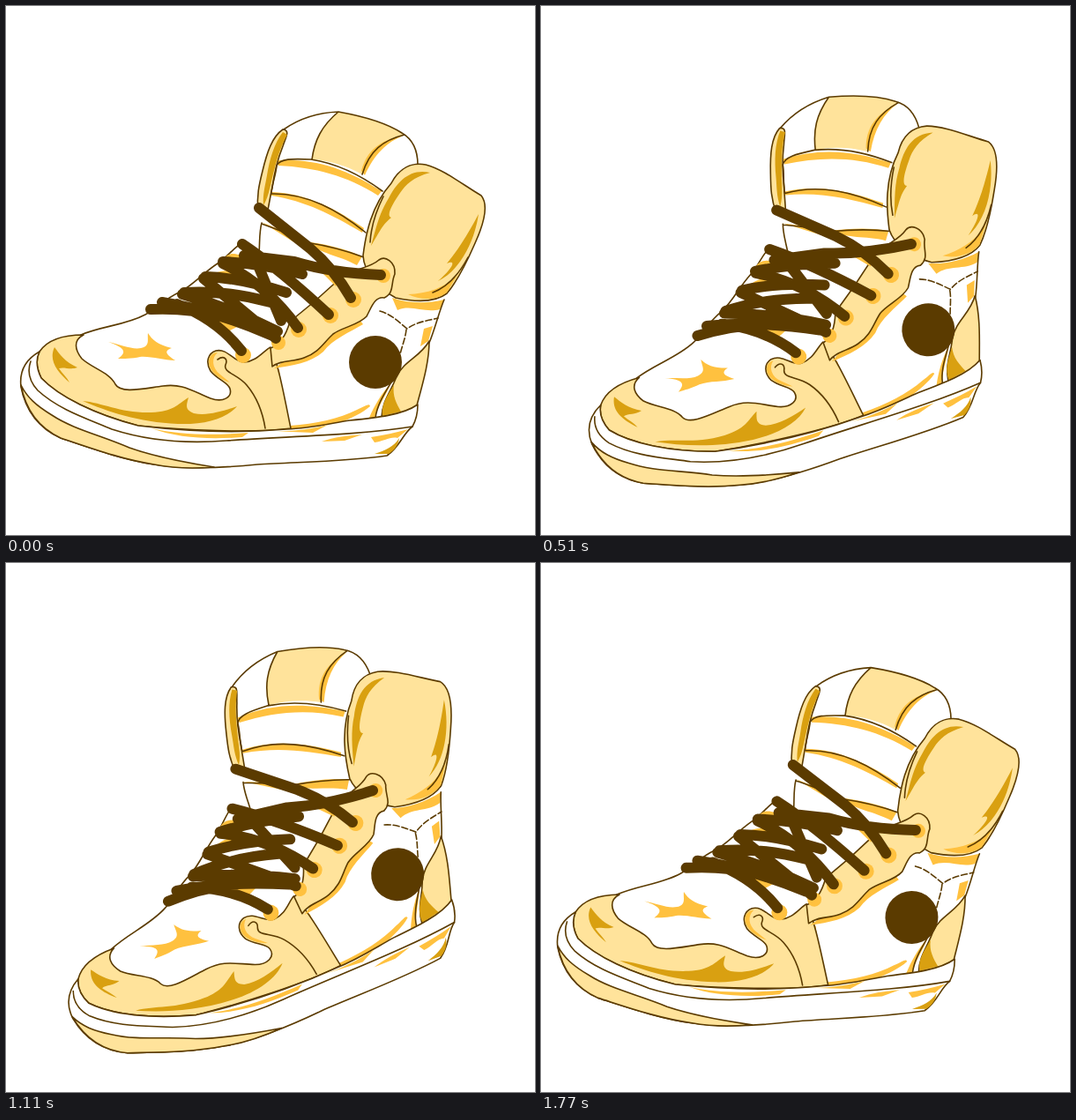
Write an HTML page that moves like this. It is 600 px wide and 600 px high and loops after 1800 ms.

```html
<!DOCTYPE html>
<html lang="en">
<head>
<meta charset="utf-8">
<title>Rocking sneaker</title>
<style>
  html, body { margin: 0; width: 100%; height: 100%; overflow: hidden; background: #fff; }
  svg { display: block; width: 100vw; height: 100vh; }
  path { fill: none; stroke-linejoin: round; stroke-linecap: round; }
  .ink { stroke: #5b3b00; stroke-width: 1.6; }
  .white { fill: #fff; }
  .pale { fill: #ffe39b; }
  .amber { fill: #ffc13f; }
  .gold { fill: #d9a011; }
  .dash { stroke-dasharray: 7 3; }
  .laces { stroke: #5b3b00; stroke-width: 12; }
  .mark { fill: #5b3b00; }
</style>
</head>
<body>
<svg viewBox="0 0 600 600">
<g id="shoe">
  <!-- vamp and quarter -->
  <path class="white" d="M85 373C110 364 140 360 160 348L215 314 245 285 285 250 440 325 497 335C490 350 487 366 481 382L467 452 318 480 150 470Z"/>
  <path class="ink" d="M85 373C108 363 136 362 158 350C170 344 178 333 198 324C214 315 222 304 240 292C252 284 258 274 270 267"/>
  <path class="amber" d="M222 315C232 304 240 298 262 301L298 316 286 320C268 306 240 306 222 315ZM246 287C254 278 262 280 276 288L268 292ZM196 330L212 324 222 332Z"/>
  <path class="amber" d="M116 381C130 384 143 390 153 388C164 386 160 378 161 371C166 379 172 384 188 388C179 391 181 395 192 402C178 402 165 397 152 398C143 400 133 400 127 400C137 393 136 388 116 381Z"/>

  <!-- tongue -->
  <path class="white" d="M315 140C332 128 352 121 377 120C405 125 432 133 449 144C461 151 467 162 467 182L405 290 287 278 286 222Z"/>
  <path class="pale ink" d="M314 140C302 148 296 166 291 187C287 203 284 216 286 232L296 236C299 222 300 214 302 206C304 191 308 174 314 159C317 149 323 141 314 140Z"/>
  <path class="gold" d="M314 143C304 156 299 174 296 192C294 204 291 213 292 226C299 215 300 200 305 183C309 168 313 157 319 146Z"/>
  <path class="pale" d="M377 120C405 125 430 132 452 146C428 152 412 164 404 191C386 181 366 175 347 174C350 152 358 138 377 120Z"/>
  <path class="amber" d="M451 147C432 154 418 168 407 192L403 187C409 164 424 152 451 147Z"/>
  <path class="amber" d="M309 175C350 173 385 184 426 210L422 215C386 192 350 183 309 181ZM301 211C342 212 377 232 406 252L404 257C372 238 340 221 301 215ZM290 245C305 252 320 256 335 264L330 270ZM340 267C360 270 382 274 404 284L398 294C376 282 358 282 340 267Z"/>
  <path class="ink" d="M315 140C332 128 352 121 377 120C405 125 432 133 449 144C461 151 467 162 467 180M377 120C358 136 350 152 347 174M452 146C428 152 412 164 404 191M307 181C311 173 324 173 346 174C378 179 404 193 427 210M307 181C306 193 301 203 301 213C342 212 377 232 408 257M290 246C287 257 288 268 287 280M290 247C304 252 316 256 330 264M340 268C365 272 385 277 406 285"/>

  <!-- ankle flap -->
  <path class="pale ink" d="M437 201C446 184 460 177 476 180C496 185 520 204 539 215C548 226 542 247 532 269C522 292 512 312 500 326C487 336 465 336 442 331C422 320 406 302 405 283C408 259 414 227 437 201Z"/>
  <path class="gold" d="M481 189C458 184 444 199 434 218C424 234 420 250 414 272C425 254 427 248 437 240C430 238 440 222 447 212C453 203 462 194 481 189ZM536 236C522 262 513 276 500 292C512 287 506 298 490 312C513 301 531 270 536 236Z"/>
  <path class="amber" d="M514 302C502 318 480 326 456 327C472 335 490 333 500 325Z"/>
  <path class="ink" d="M428 216C420 232 414 250 413 268M524 285C514 304 502 318 484 325"/>

  <!-- heel -->
  <path class="amber" d="M438 331C455 337 476 338 497 333L492 344C475 349 460 338 444 345Z"/>
  <path class="pale ink" d="M480 380C470 398 452 402 443 420C437 437 427 447 426 466L452 461 466 453C472 430 480 405 480 380Z"/>
  <path class="gold" d="M440 430C432 442 425 453 427 465L448 460C443 451 438 442 440 430Z"/>
  <path class="amber" d="M437 427C425 441 418 453 412 467L418 467C424 450 432 440 437 427ZM474 366L484 363 479 380 470 386Z"/>
  <path class="ink" d="M497 333C491 347 487 365 480 382M438 425C429 440 421 452 419 467"/>
  <path class="ink dash" d="M424 346C438 350 446 359 455 366C466 358 478 357 490 354M454 367C453 378 448 388 446 400"/>
  <circle class="mark" cx="419" cy="404" r="30"/>
  <path class="amber" d="M322 476C352 474 378 468 398 458C408 454 412 450 413 454C404 462 392 467 378 473L322 480ZM302 409C307 424 310 438 317 452C315 438 311 424 310 412Z"/>

  <!-- toe cap -->
  <path class="pale ink" d="M38 392C46 380 62 373 88 373C76 379 78 390 86 400C98 411 118 416 124 429C130 440 155 434 178 431C200 428 210 436 232 445C246 450 257 444 254 434C252 427 240 424 232 414C226 404 229 394 238 391C252 388 258 404 270 404C285 403 292 391 300 387C309 405 316 445 323 479C280 485 200 481 150 476C100 463 60 443 40 422C34 410 34 400 38 392Z"/>
  <path class="gold" d="M87 448C110 450 130 462 165 461C190 460 194 452 207 444C205 452 202 458 213 462C228 465 245 460 262 454C250 468 225 475 195 474C150 472 115 460 87 448ZM55 387C61 395 67 404 81 410C73 413 66 409 60 411C64 417 69 421 72 427C58 415 48 402 55 387Z"/>
  <path class="amber" d="M240 393C233 399 233 410 243 418L254 427C243 424 230 414 230 404C230 397 234 393 240 393Z"/>
  <path class="ink" d="M240 401C247 396 252 400 249 407C246 416 262 417 273 430C284 443 291 460 294 479"/>

  <!-- sole -->
  <path class="white ink" d="M38 392C22 401 15 415 17 432C22 458 36 478 62 490C95 501 130 514 168 520C205 526 245 524 285 520C330 517 385 517 432 510C447 500 450 485 461 477C466 468 467 460 467 452C450 464 420 467 390 470C365 474 345 479 318 480C260 485 200 482 150 476C100 463 60 443 40 422C34 410 34 400 38 392Z"/>
  <path class="pale ink" d="M17 430C22 457 36 478 62 490C95 501 130 514 168 520C188 524 210 525 236 523C198 517 168 511 140 501C108 487 76 480 52 464C34 453 24 444 17 430Z"/>
  <path class="amber" d="M165 479C200 487 235 487 275 484L268 489C230 492 195 490 165 479ZM300 482C325 483 345 480 365 475L348 484ZM358 494C372 489 388 487 404 486L384 493ZM414 489C428 487 442 484 456 480L444 490C436 488 428 494 418 495Z"/>
  <path class="gold" d="M446 490C440 500 430 504 418 508L434 508C442 503 445 497 446 490Z"/>
  <path class="ink" d="M28 403C24 414 26 425 36 436C60 458 92 468 120 480C160 493 200 497 250 493C320 488 400 487 461 477"/>

  <!-- eyestay -->
  <path class="amber" d="M304 411C325 408 345 405 360 392C370 378 390 370 405 361L398 352 330 392Z"/>
  <path class="pale ink" d="M300 388C312 384 318 372 322 358L350 335 380 308C395 297 412 298 423 288C430 283 442 290 441 304C436 315 441 325 429 331C418 329 414 343 409 352C400 362 382 364 371 372C360 382 355 393 338 399C325 404 312 401 302 409Z"/>
  <g class="amber">
    <circle cx="428" cy="306" r="8"/><circle cx="394" cy="333" r="9"/><circle cx="368" cy="351" r="9"/>
    <circle cx="332" cy="367" r="9"/><circle cx="309" cy="382" r="8"/><circle cx="269" cy="396" r="9"/>
  </g>
  <path class="amber" d="M250 340C268 342 282 350 296 360L280 364ZM226 350C240 350 250 358 262 364L250 370ZM352 296L380 306 374 318Z"/>

  <!-- laces -->
  <path class="laces" d="M287 229L345 275Q372 298 391 331M425 305Q370 303 327 290L270 283M268 270Q310 298 366 350M246 290Q290 292 336 304M246 292Q295 315 331 365M226 307Q265 308 318 325M224 309Q262 340 306 377M202 325Q250 322 300 336M200 327Q255 342 308 369M177 336Q235 345 300 373M164 344Q205 342 245 352M194 338Q240 356 267 391M285 292L312 357"/>
</g>
</svg>
<script>
  const shoe = document.getElementById('shoe');
  const STEP = 30, STEPS = 60, SWING = 26;

  function draw() {
    const n = Math.floor(performance.now() / STEP) % STEPS;
    const swing = 1 - Math.abs(1 - n / (STEPS / 2));
    shoe.setAttribute('transform', `rotate(${-SWING * swing} 287 307)`);
    requestAnimationFrame(draw);
  }
  draw();
</script>
</body>
</html>
```
